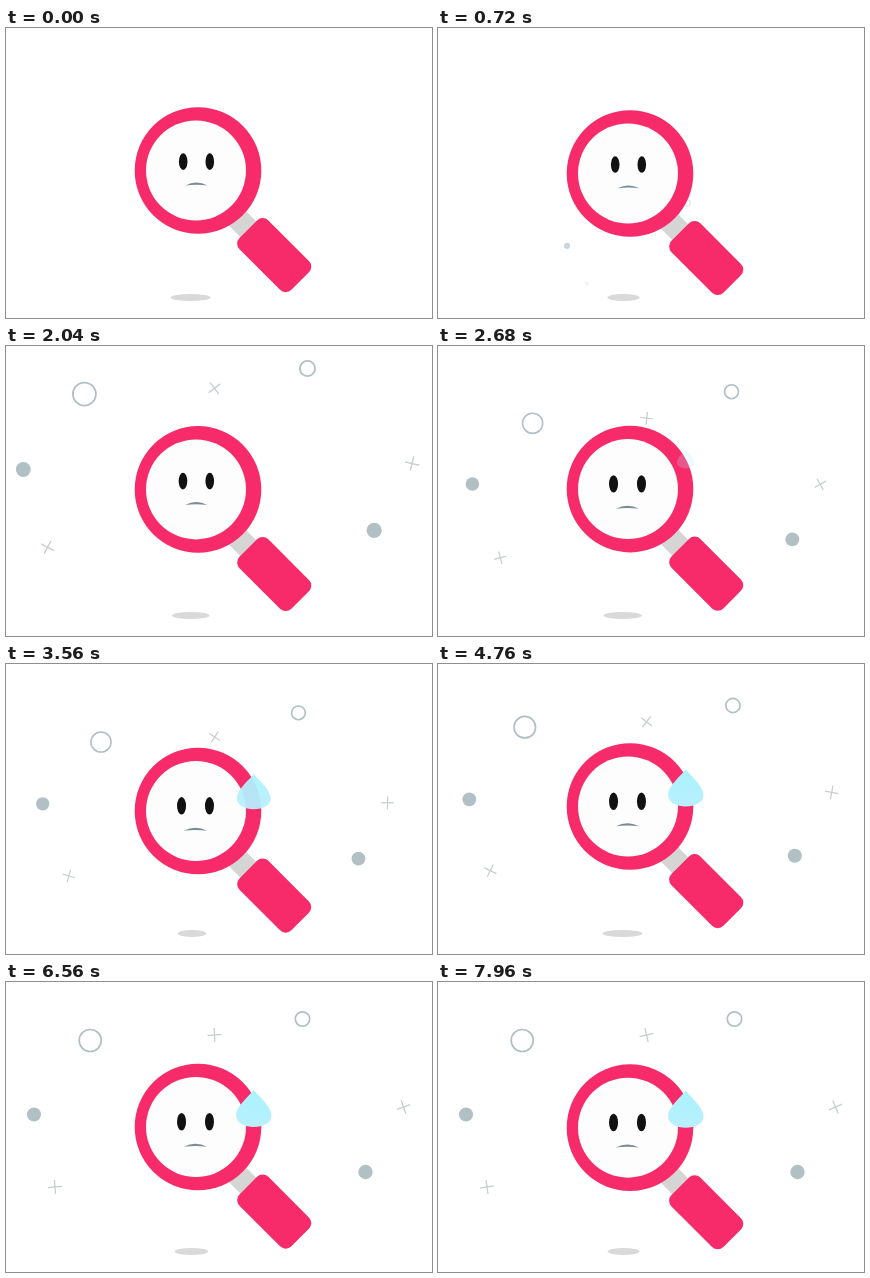
An HTML page that plays this animation: 426x290 px, repeating every 8 s.

```html
<!DOCTYPE html>
<html lang="en">
<head>
<meta charset="utf-8">
<title>Worried magnifier</title>
<style>
  html, body { margin: 0; width: 100%; height: 100%; overflow: hidden; background: #fff; }
  svg { display: block; width: 100vw; height: 100vh; }
  .dot { fill: #b0c0c4; }
  .ring { fill: none; stroke: #b0c0c4; stroke-width: 1.7; }
  .cross { stroke: #c8cdcf; stroke-width: 1.3; }
  .pink { fill: #f72b69; }
</style>
</head>
<body>
<svg viewBox="0 0 426 290">
  <defs>
    <path id="plus" d="M-7 0H7M0-7V7"/>
    <linearGradient id="water" x1="0" y1="0" x2="0" y2="1">
      <stop offset="0" stop-color="#a9f3fd"/>
      <stop offset="1" stop-color="#b9effe"/>
    </linearGradient>
  </defs>

  <g id="dots">
    <circle class="dot" cx="28" cy="132.5" r="7"/>
    <circle class="dot" cx="359.5" cy="190" r="7.2"/>
    <circle class="ring" cx="296.5" cy="37" r="7.2"/>
  </g>
  <g id="crosses">
    <circle class="ring" cx="84.2" cy="58.5" r="11"/>
    <use class="cross" href="#plus" data-x="49" data-y="205" data-angle="75" data-spin="-67"/>
    <use class="cross" href="#plus" data-x="208.5" data-y="53" data-angle="20" data-spin="-72"/>
    <use class="cross" href="#plus" data-x="397.5" data-y="125" data-angle="60" data-spin="-67"/>
  </g>

  <ellipse id="shadow" cy="269.5" ry="3.5" fill="#d9d9d9"/>

  <g id="glass">
    <g transform="translate(268.2 227.1) rotate(45)">
      <rect x="-70" y="-11.2" width="40" height="22.4" fill="#d5d5d5"/>
      <rect class="pink" x="-36.7" y="-20.4" width="73.4" height="40.8" rx="8"/>
    </g>
    <circle class="pink" cx="192" cy="142.5" r="63.3"/>
    <circle cx="190" cy="142.5" r="50" fill="#fdfdfd"/>
    <g id="face">
      <ellipse cx="-13.2" cy="0" rx="4.3" ry="8.3" fill="#111"/>
      <ellipse cx="13.4" cy="0" rx="4.3" ry="8.3" fill="#111"/>
      <path d="M-11 23.8Q0 18 11 23.8Q0 22.3-11 23.8Z" fill="#7b8b98"/>
    </g>
    <path id="drop" fill="url(#water)" d="M0 0C2.5 4 17.7 16 17.7 25.5C17.7 33 9 37 0 37S-17.7 33-17.7 25.5C-17.7 16-2.5 4 0 0Z"/>
  </g>
</svg>
<script>
const LOOP = 8000, BOB = 2400;
const el = id => document.getElementById(id);
const set = (node, attrs) => {
  for (const name in attrs) node.setAttribute(name, attrs[name]);
};
const mix = (a, b, p) => a + (b - a) * p;
const ramp = (t, from, to) => Math.min(1, Math.max(0, (t - from) / (to - from)));
const smooth = p => p * p * (3 - 2 * p);

// Linear interpolation through [time, value] pairs.
function track(t, keys) {
  const next = keys.findIndex(key => key[0] > t);
  if (next < 0) return keys[keys.length - 1][1];
  if (next === 0) return keys[0][1];
  const [t0, v0] = keys[next - 1], [t1, v1] = keys[next];
  return mix(v0, v1, (t - t0) / (t1 - t0));
}

const dotScale = [[40, 0], [1720, 1.105], [2880, .936], [5500, 1]];
const crossScale = [[260, 0], [1620, 1.13], [2880, .878], [5140, 1]];
const crosses = [...document.querySelectorAll('.cross')];

function burst(id, scale, opacity) {
  set(el(id), {
    transform: `translate(211 287) scale(${scale}) translate(-211 -287)`,
    opacity
  });
}

function draw(t) {
  const dip = (1 - Math.cos(2 * Math.PI * t / BOB)) / 2;
  set(el('glass'), { transform: `translate(0 ${4.5 * dip})` });
  set(el('shadow'), { cx: mix(184.5, 186, dip), rx: mix(20, 14.2, dip) });

  const appear = ramp(t, 500, 840);
  burst('dots', track(t, dotScale), appear);
  burst('crosses', track(t, crossScale), appear);
  for (const cross of crosses) {
    const { x, y, angle, spin } = cross.dataset;
    set(cross, { transform: `translate(${x} ${y}) rotate(${+angle + spin * t / 1000})` });
  }

  const worry = smooth(ramp(t, 1900, 2500));
  set(el('face'), {
    transform: `translate(${mix(190.4, 189.4, worry)} ${mix(133.6, 137.3, worry)}) scale(${mix(1, 1.05, worry)})`
  });

  const sweat = ramp(t, 2400, 3640);
  set(el('drop'), {
    transform: `translate(247.8 ${mix(102.5, 105.6, sweat)}) scale(${mix(.35, 1, sweat)})`,
    opacity: sweat
  });
}

const start = performance.now();
function frame() {
  draw((performance.now() - start) % LOOP);
  requestAnimationFrame(frame);
}
frame();
</script>
</body>
</html>
```
